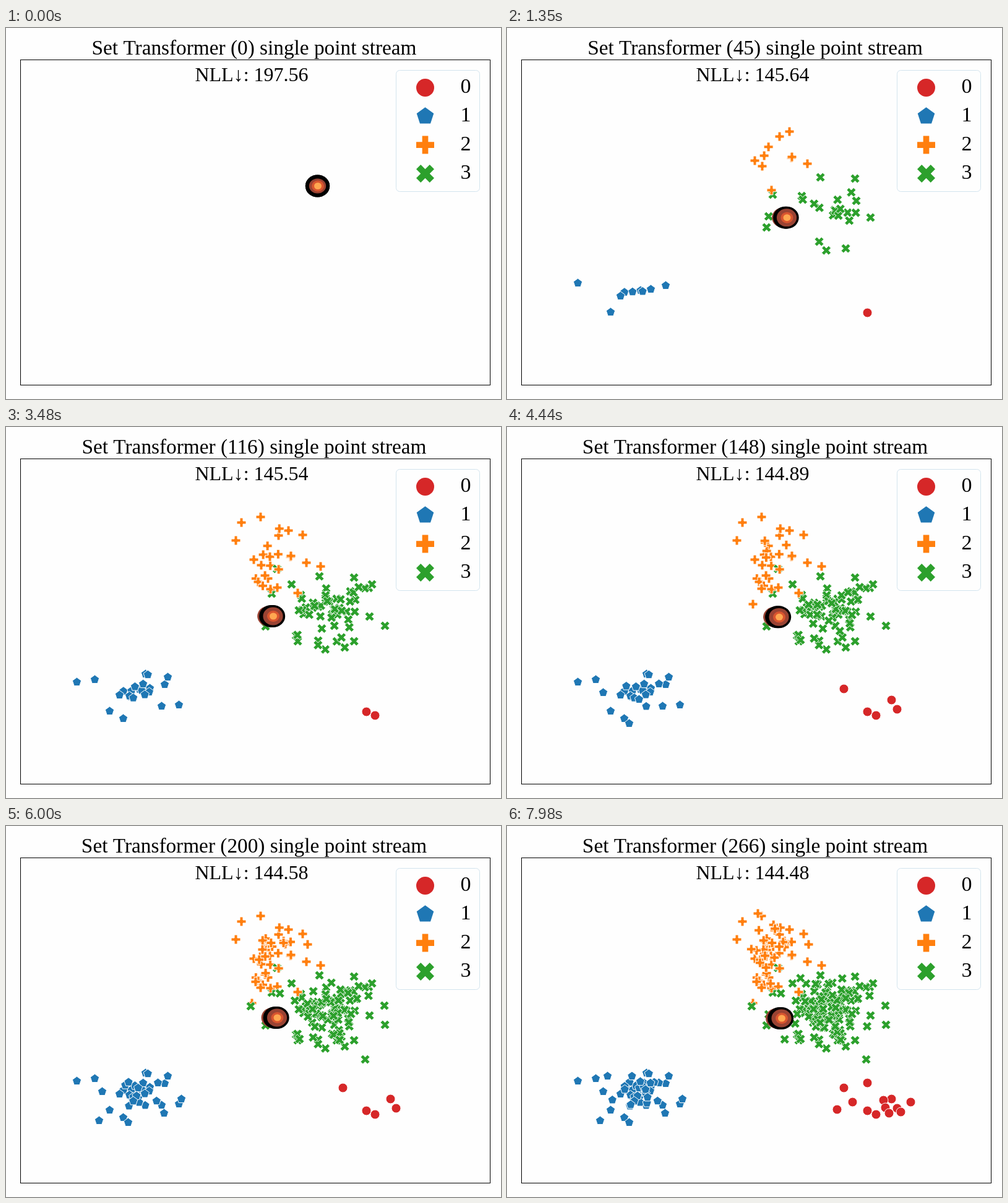
Animation of 800x600 px, one loop 8 s. Source, as an HTML page with a canvas:

```html
<!DOCTYPE html>
<html lang="en">
<head>
<meta charset="utf-8">
<title>Set Transformer single point stream</title>
<style>
  html, body { margin: 0; width: 100%; height: 100%; overflow: hidden; background: #fefefe; }
  canvas { display: block; }
</style>
</head>
<body>
<canvas id="stage" width="800" height="600"></canvas>
<script>
const ctx = document.getElementById('stage').getContext('2d');
const LOOP = 8000, STEP = 30, TAU = Math.PI * 2;
const FONT = '"Liberation Serif", "Times New Roman", serif';
const COLORS = ['#d62728', '#1f77b4', '#ff7f0e', '#2ca02c'];

// Unit marker outlines, centred on the origin.
function turn([x, y], a, scale = 1) {
  const c = Math.cos(a) * scale, s = Math.sin(a) * scale;
  return [x * c - y * s, x * s + y * c];
}
const corner = [[-1 / 6, -1 / 2], [1 / 6, -1 / 2], [1 / 6, -1 / 6]];
const plus = [0, 1, 2, 3].flatMap(q => corner.map(p => turn(p, q * TAU / 4)));
const pentagon = [0, 1, 2, 3, 4].map(i => turn([0, -0.5], i * TAU / 5));
const cross = plus.map(p => turn(p, TAU / 8, 0.75 * Math.SQRT2));
const SHAPES = [null, pentagon, plus, cross];

// Per stage: last step, then outlying points (x, y) of each class in arrival order.
const STAGES = [
  [45, [582, 460],
    [114, 412, 167, 459, 183, 433, 232, 422, 256, 416],
    [440, 175, 400, 214, 456, 167, 412, 223, 460, 208, 485, 219],
    [506, 241, 587, 306, 562, 243, 429, 269, 504, 345, 419, 322, 564, 279, 547, 356]],
  [70, [],
    [225, 399, 143, 408, 251, 451],
    [411, 145, 371, 183, 407, 250],
    [591, 254]],
  [116, [596, 466],
    [189, 471, 261, 404, 279, 449],
    [380, 154, 508, 225, 479, 174, 471, 268],
    [461, 254, 471, 346, 612, 321]],
  [148, [630, 456, 544, 423, 621, 441],
    [197, 479, 155, 429],
    [397, 286, 411, 261],
    []],
  [200, [],
    [150, 476, 255, 464, 283, 441],
    [487, 191],
    [611, 290, 395, 291, 580, 377]],
  [266, [652, 446, 582, 415, 533, 458, 558, 446, 636, 462, 608, 443, 611, 455, 617, 464],
    [162, 404],
    [405, 141],
    []]
];

// Dense core of each class: arrivals per step, centre and half extent.
const CORES = [
  { rate: 0 },
  { rate: 0.19, x: 217, y: 432, w: 56, h: 42 },
  { rate: 0.23, x: 431, y: 207, w: 62, h: 84 },
  { rate: 0.54, x: 511, y: 296, w: 92, h: 76 }
];

let seed = 11;
function random() {
  seed = (seed * 16807) % 2147483647;
  return seed / 2147483647;
}
const bell = () => (random() + random() + random()) / 1.5 - 1;

const points = [];
let from = 0;
for (const [to, ...runs] of STAGES) {
  const span = to - from;
  const add = (kind, i, n, x, y) =>
    points.push({ kind, x, y, born: Math.max(1, Math.round(from + (i + 0.5) / n * span)) });
  runs.forEach((run, kind) => {
    const core = CORES[kind], fixed = run.length / 2;
    for (let i = 0; i < fixed; i++) add(kind, i, fixed, run[2 * i], run[2 * i + 1]);
    const fill = Math.max(0, Math.round(core.rate * span) - fixed);
    for (let i = 0; i < fill; i++) {
      add(kind, i, fill, core.x + bell() * core.w, core.y + bell() * core.h);
    }
  });
  from = to;
}
points.sort((a, b) => a.born - b.born);

// step, centre x, centre y, NLL
const KEYS = [
  [0, 503.5, 255.5, 197.56],
  [45, 452, 306.7, 145.64],
  [70, 437.5, 299, 146.68],
  [116, 431.5, 306, 145.54],
  [148, 439.5, 307.3, 144.89],
  [200, 438, 310, 144.58],
  [266, 443.5, 311, 144.48]
];

function stateAt(n) {
  let i = 0;
  while (i < KEYS.length - 2 && n >= KEYS[i + 1][0]) i++;
  const a = KEYS[i], b = KEYS[i + 1];
  let u = (n - a[0]) / (b[0] - a[0]);
  if (i === 0) u = (1 - Math.exp(-6 * u)) / (1 - Math.exp(-6));
  return a.map((v, k) => v + (b[k] - v) * u);
}

function marker(kind, x, y, size, edge) {
  ctx.beginPath();
  if (kind === 0) ctx.arc(x, y, size / 2, 0, TAU);
  else SHAPES[kind].forEach(([px, py]) => ctx.lineTo(x + px * size, y + py * size));
  ctx.closePath();
  ctx.fillStyle = COLORS[kind];
  ctx.fill();
  if (edge) {
    ctx.strokeStyle = '#fff';
    ctx.lineWidth = 1;
    ctx.stroke();
  }
}

function disc(x, y, rx, ry, color) {
  ctx.beginPath();
  ctx.ellipse(x, y, rx, ry, 0, 0, TAU);
  ctx.fillStyle = color;
  ctx.fill();
}

function text(s, x, y, size) {
  ctx.font = size + 'px ' + FONT;
  ctx.fillStyle = '#000';
  ctx.fillText(s, x, y);
}

function density(x, y, n) {
  const rear = 7 * (1 - Math.exp(-n / 30));
  const inset = 3.6 + 2.4 * Math.exp(-n / 5);
  disc(x - rear, y, 18.5, 16.5, '#9a4333');
  for (const dx of [rear * 0.4, 0]) {
    disc(x - dx, y, 19.7, 18, '#000');
    disc(x - dx, y, 19.7 - inset, 18 - inset, '#9a4333');
  }
  disc(x + 0.5, y, 10, 9, '#d9552f');
  disc(x + 0.5, y, 6, 5.5, '#ffa750');
}

function legend() {
  ctx.beginPath();
  ctx.roundRect(630.5, 68.5, 135, 196, 6);
  ctx.fillStyle = '#fefefe';
  ctx.fill();
  ctx.strokeStyle = '#d3e4ee';
  ctx.lineWidth = 1;
  ctx.stroke();
  for (let k = 0; k < 4; k++) {
    marker(k, 677.5, 96.5 + k * 46.3, 29, false);
    text(String(k), 743, 105 + k * 46.3, 34);
  }
}

function draw(n) {
  ctx.fillStyle = '#fefefe';
  ctx.fillRect(0, 0, 800, 600);
  ctx.textAlign = 'center';
  for (const p of points) {
    if (p.born > n) break;
    marker(p.kind, p.x + 0.5, p.y + 0.5, 15, true);
  }
  const [, x, y, nll] = stateAt(n);
  density(x, y, n);
  ctx.strokeStyle = '#000';
  ctx.lineWidth = 1;
  ctx.strokeRect(23.5, 51.5, 759, 526);
  text(`Set Transformer (${n}) single point stream`, 401, 43, 33.3);
  text(`NLL↓: ${nll.toFixed(2)}`, 397, 86, 32);
  legend();
}

const start = performance.now();
function tick() {
  const t = (performance.now() - start) % LOOP;
  draw(Math.floor(t / STEP));
  requestAnimationFrame(tick);
}
tick();
</script>
</body>
</html>
```
